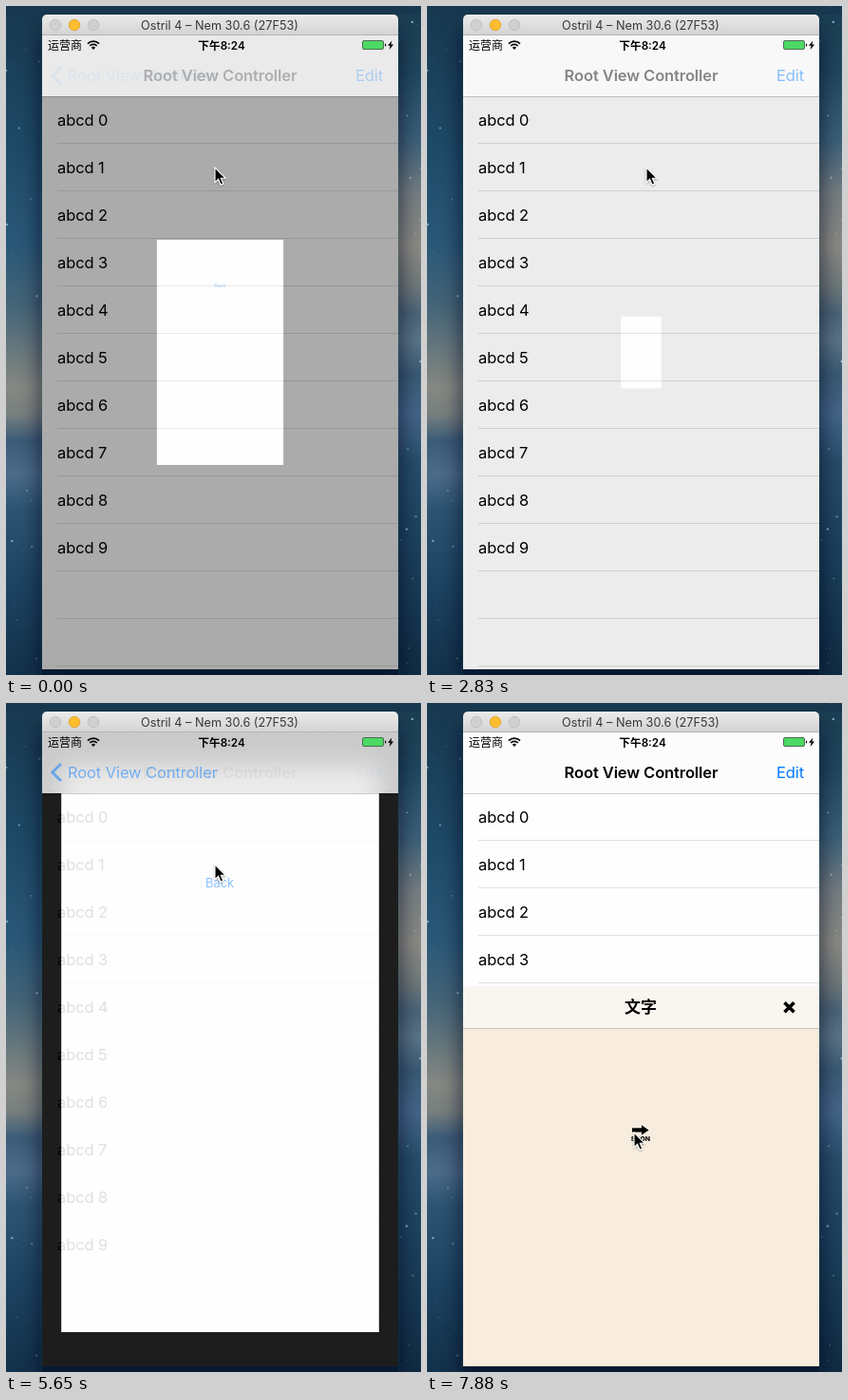
These frames come from a looping animation (437x704 px, 8 s). An HTML page:

```html
<!DOCTYPE html>
<html lang="en">
<head>
<meta charset="utf-8">
<title>Zoom transition</title>
<style>
  html, body { margin: 0; width: 100%; height: 100%; overflow: hidden; background: #1c4058; }
  svg { display: block; width: 100%; height: 100%; }
  text { font-family: Inter, "Noto Sans CJK SC", "Noto Sans CJK", sans-serif; }
  .body { font-size: 16.5px; letter-spacing: -.1px; }
  .blue { fill: #007aff; }
  .mid { text-anchor: middle; }
</style>
</head>
<body>
<svg viewBox="0 0 437 704">
  <defs>
    <linearGradient id="skyL" x2="0" y2="1">
      <stop offset="0" stop-color="#17384f"/><stop offset=".21" stop-color="#1e4a68"/>
      <stop offset=".36" stop-color="#2b5878"/><stop offset=".45" stop-color="#456578"/>
      <stop offset=".57" stop-color="#858882"/><stop offset=".61" stop-color="#77807f"/>
      <stop offset=".65" stop-color="#3b5b78"/><stop offset=".7" stop-color="#4b6b89"/>
      <stop offset=".75" stop-color="#2d5573"/><stop offset=".86" stop-color="#1d4463"/>
      <stop offset="1" stop-color="#12314a"/>
    </linearGradient>
    <linearGradient id="skyR" x2="0" y2="1">
      <stop offset="0" stop-color="#1a3c52"/><stop offset=".1" stop-color="#20485f"/>
      <stop offset=".2" stop-color="#3b6078"/><stop offset=".28" stop-color="#757e82"/>
      <stop offset=".36" stop-color="#8a8a84"/><stop offset=".42" stop-color="#6d787a"/>
      <stop offset=".46" stop-color="#4a6478"/><stop offset=".5" stop-color="#5a7487"/>
      <stop offset=".55" stop-color="#395a74"/><stop offset=".61" stop-color="#44668a"/>
      <stop offset=".68" stop-color="#274e6c"/><stop offset=".8" stop-color="#1c425f"/>
      <stop offset="1" stop-color="#102c44"/>
    </linearGradient>
    <linearGradient id="chrome" x2="0" y2="1">
      <stop offset="0" stop-color="#ebebeb"/><stop offset="1" stop-color="#d2d2d2"/>
    </linearGradient>
    <filter id="soft" x="-20%" y="-20%" width="140%" height="140%"><feGaussianBlur stdDeviation="11"/></filter>
    <filter id="frost" x="-20%" y="-20%" width="140%" height="140%"><feGaussianBlur stdDeviation="13"/></filter>
    <filter id="drop" x="-50%" y="-50%" width="200%" height="200%">
      <feDropShadow dx="0" dy="1" stdDeviation="1" flood-opacity=".35"/>
    </filter>
    <clipPath id="screen"><rect x="38" y="31" width="375" height="667"/></clipPath>
    <clipPath id="barClip"><rect x="38" y="31" width="375" height="64"/></clipPath>
    <g id="detail">
      <rect x="38" y="31" width="375" height="667" fill="#fefefe"/>
      <text id="back" class="blue mid" x="225" y="173" font-size="14.5">Back</text>
    </g>
  </defs>

  <rect width="225" height="704" fill="url(#skyL)"/>
  <rect x="225" width="212" height="704" fill="url(#skyR)"/>
  <rect y="0" width="437" height="9" fill="#17384f"/>
  <g id="stars" fill="#a9cbe0"/>
  <rect x="36" y="26" width="379" height="686" fill="#020d1c" opacity=".62" filter="url(#soft)"/>
  <rect x="38" y="698" width="375" height="6" fill="#071830" opacity=".8"/>

  <path d="M38 31V14a5 5 0 0 1 5-5H408a5 5 0 0 1 5 5V31z" fill="url(#chrome)"/>
  <path d="M38 30.5H413" stroke="#b4b4b4"/>
  <g stroke-width=".8">
    <circle cx="52" cy="20" r="5.8" fill="#d0d0d0" stroke="#bbb"/>
    <circle cx="72" cy="20" r="5.8" fill="#fdbd2e" stroke="#e0a02a"/>
    <circle cx="92" cy="20" r="5.8" fill="#d0d0d0" stroke="#bbb"/>
  </g>
  <text class="mid" x="225" y="24.8" font-size="12.7" fill="#383838">Ostril 4 – Nem 30.6 (27F53)</text>

  <g clip-path="url(#screen)">
    <rect id="floor" x="38" y="31" width="375" height="667"/>
    <use id="under" href="#detail"/>
    <g id="list">
      <rect x="38" y="31" width="375" height="667" fill="#fefefe"/>
      <rect id="pick" x="38" width="375" height="50" fill="#d9d9d9"/>
      <g id="rows"/>
    </g>
    <use id="over" href="#detail"/>
    <rect id="bar" x="38" y="31" width="375" height="64"/>
    <g clip-path="url(#barClip)">
      <rect id="glow" fill="#fcfcfc" opacity=".7" filter="url(#frost)"/>
    </g>
    <rect x="38" y="95" width="375" height="1" opacity=".2"/>
    <g id="backItem">
      <path d="M58 64l-9.2 9 9.2 9" fill="none" stroke="#007aff" stroke-width="3"/>
      <text class="body blue" x="65" y="79">Root View Controller</text>
    </g>
    <text id="title" class="body mid" x="225.5" y="79" font-weight="600">Root View Controller</text>
    <text id="edit" class="body blue" x="397" y="79" text-anchor="end">Edit</text>

    <text x="44" y="45.5" font-size="12">运营商</text>
    <g fill="none" stroke="#000" stroke-width="1.7">
      <path d="M86 39.6a8.6 8.6 0 0 1 12 0M88.2 42a5.4 5.4 0 0 1 7.6 0"/>
      <path d="M92 46l-2.1-2.2a3 3 0 0 1 4.2 0z" fill="#000" stroke="none"/>
    </g>
    <text class="mid" x="227" y="45.5" font-size="11.7" font-weight="600">下午8:24</text>
    <rect x="375.5" y="36.5" width="22" height="9" rx="1.5" fill="#4cd964" stroke="#4d6b53"/>
    <path d="M399 39.5v3.2q1.3-.4 1.3-1.6t-1.3-1.6z"/>
    <path d="M406.3 36.5l-4.3 5.2h2.6l-1 4.3 4.5-5.4h-2.7z"/>

    <g id="panel">
      <rect x="38" y="298" width="375" height="45" fill="#f9f5ef"/>
      <rect x="38" y="342" width="375" height="356" fill="#f7ecdd"/>
      <rect x="38" y="342" width="375" height="1" fill="#cbc4b8"/>
      <text class="mid" x="225" y="326.3" font-size="17" font-weight="600">文字</text>
      <path d="M376.5 315.3l10 10m0-10l-10 10" stroke="#000" stroke-width="3.7"/>
      <path d="M216 447.2h10v-3l7.5 5.2-7.5 5.2v-3h-10z"/>
      <text class="mid" x="224.8" y="461.3" font-size="6.8" font-weight="800">SOON</text>
    </g>
  </g>
  <path id="cursor" d="M0 0V15.6L3.6 12.3 6.1 18.2 8.8 17 6.3 11.3H11.2Z" stroke="#fff" stroke-width="1.1" filter="url(#drop)"/>
</svg>
<script>
const $ = id => document.getElementById(id);
const set = (id, attrs) => { for (const k in attrs) $(id).setAttribute(k, attrs[k]); };
const clamp = v => Math.min(1, Math.max(0, v));
const ease = u => u < .5 ? 2 * u * u : 1 - 2 * (1 - u) ** 2;

const LOOP = 8000, TICK = 148.5;   // the screen refreshes once per tick
const RATE = TICK / 500;           // share of a transition per tick

// Start tick, direction, selected row
const moves = [
  [-2.01, "pop"], [8, "push", 4], [16.27, "pop"], [24, "push", 1], [37.2, "pop"]
];
// Pointer: tick, x, y
const pointer = [
  [0, 220, 170], [1, 220, 170], [4, 204, 299], [5, 204, 299], [6, 208, 312],
  [9, 208, 312], [13, 231, 170], [30, 231, 170], [31, 230, 167], [32, 230, 167],
  [37, 220, 170], [40, 220, 170], [44, 366, 80], [49, 366, 80], [53, 218, 452]
];

let rows = "";
for (let i = 0; i < 12; i++) {
  rows += `<rect x="54" y="${144 + 50 * i}" width="359" height="1" fill="#e0e0e2"/>`;
  if (i < 10) rows += `<text class="body" x="54" y="${125.7 + 50 * i}">abcd ${i}</text>`;
}
$("rows").innerHTML = rows;

let seed = 11;
const rand = () => (seed = seed * 16807 % 2147483647) / 2147483647;
let stars = "";
for (let i = 0; i < 110; i++) {
  const x = i % 5 < 3 ? rand() * 38 : 413 + rand() * 24;
  const y = rand() * 704;
  stars += `<circle cx="${x}" cy="${y}" r="${.3 + rand() ** 4 * 1.1}" opacity="${.25 + rand() * .6}"/>`;
}
$("stars").innerHTML = stars;

function pointAt(k) {
  const i = Math.max(1, pointer.findIndex(p => p[0] >= k));
  const [k0, x0, y0] = pointer[i - 1], [k1, x1, y1] = pointer[i];
  const u = clamp((k - k0) / (k1 - k0));
  return [Math.round(x0 + (x1 - x0) * u), Math.round(y0 + (y1 - y0) * u)];
}

function render(ms) {
  const k = Math.floor(ms % LOOP / TICK);
  const [start, kind, row] = moves.filter(m => m[0] <= k).pop();
  const pop = kind === "pop";
  const raw = (k - start) * RATE, u = clamp(raw);
  const shown = pop ? 1 - ease(u) : ease(u);
  const scale = .045 + .955 * shown;
  const zoom = `translate(225.5 364.5) scale(${scale}) translate(-225.5 -364.5)`;

  set("floor", { fill: pop ? "#000" : "#fefefe" });
  set("under", { transform: zoom, opacity: pop && u < 1 ? 1 : 0 });
  set("list", { opacity: pop ? 1 - shown : 1 });
  set("over", { transform: zoom, opacity: pop ? 0 : shown });
  set("pick", { y: 95 + 50 * (row || 0), opacity: !pop && u < 1 ? 1 : 0 });

  const next = moves.find(m => m[0] > k);
  const pressed = !pop && next && k >= Math.ceil(next[0]) - 2;
  set("back", { opacity: pressed ? .2 : pop ? clamp(.2 + 1.3 * u) : 1 });

  // The translucent bar picks up the dark backdrop and the shrinking page
  const grey = Math.round(252 - (pop ? 56 * shown : 0));
  set("bar", { fill: `rgb(${grey},${grey},${grey})` });
  set("glow", {
    x: 225.5 - 187.5 * scale, y: 364.5 - 333.5 * scale,
    width: 375 * scale, height: 667 * scale,
    visibility: pop && u < 1 ? "visible" : "hidden"
  });

  const nav = pop ? raw : raw + .33;
  const fadeIn = clamp(.7 * nav * nav), fadeOut = clamp(1 - 1.25 * nav) ** 2;
  const root = pop ? fadeIn : fadeOut;
  set("title", { opacity: root });
  set("backItem", { opacity: pop ? fadeOut : fadeIn });
  set("edit", { opacity: k === 46 ? .2 : k === 47 ? .6 : root });

  const rise = ease(clamp((k - 46.6) * RATE));
  set("panel", { transform: `translate(0 ${400 * (1 - rise)})` });
  set("cursor", { transform: `translate(${pointAt(k).join(" ")})` });
}

let begin;
function loop(now) {
  begin ??= now;
  render(now - begin);
  requestAnimationFrame(loop);
}
render(0);
requestAnimationFrame(loop);
</script>
</body>
</html>
```
